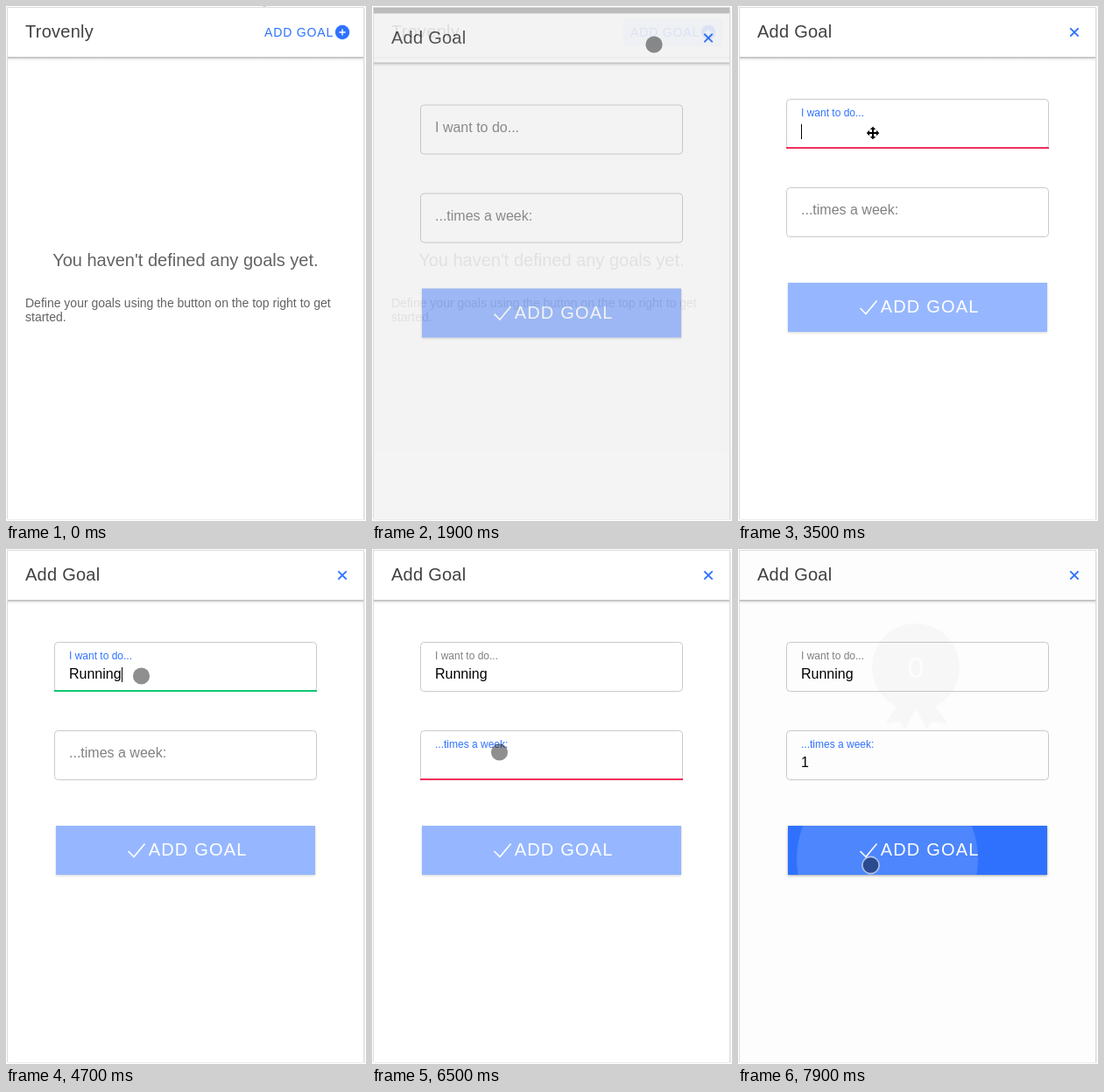
These frames come from a looping animation (411x588 px, 8 s). An HTML page:

```html
<!DOCTYPE html>
<html lang="en">
<head>
<meta charset="utf-8">
<title>Goal tracker</title>
<style>
  html, body { margin: 0; width: 100%; height: 100%; overflow: hidden; background: #fff; }
  svg { display: block; width: 100vw; height: 100vh; }
  text { font-family: "Liberation Sans", Arial, sans-serif; white-space: pre; }
  .title { font-size: 20px; letter-spacing: .25px; fill: #424242; }
  .soft { fill: #636363; }
  .p { font-size: 14px; }
  #submit { filter: drop-shadow(0 1.5px 1.5px rgba(0, 0, 0, .35)); }
</style>
</head>
<body>
<svg id="stage" viewBox="0 0 411 588"></svg>
<script>
const LOOP = 8000, STEP = 100;
const BLUE = '#2f72ff', GREY = '#808080', RED = [240, 47, 91], GREEN = [16, 200, 112];
const $ = id => document.getElementById(id);
const set = (id, attrs) => { for (const k in attrs) $(id).setAttribute(k, attrs[k]); };
const clamp = x => Math.min(1, Math.max(0, x));
const span = (t, from, len) => clamp((t - from) / len);
const easeOut = x => 1 - (1 - x) ** 4;
const mix = (a, b, p) => a + (b - a) * p;
const mixRgb = (a, b, p) => `rgb(${a.map((v, i) => Math.round(mix(v, b[i], p)))})`;

const page = title => `
  <rect x="2" y="2" width="406" height="584" fill="#fff"/>
  <rect x="2" y="58" width="406" height="5" fill="url(#headShade)"/>
  <text class="title" x="22" y="36">${title}</text>`;

const field = (id, y, label) => `
  <rect x="55.5" y="${y + .5}" width="299" height="56" rx="4" fill="#fff" stroke="#cacaca"/>
  <rect id="${id}Line" y="${y + 55}" height="2"/>
  <text id="${id}Label" x="72">${label}</text>
  <text id="${id}Value" x="72" y="${y + 42}" font-size="16"></text>
  <rect id="${id}Caret" y="${y + 29}" width="1" height="17"/>`;

const arrow = [0, 90, 180, 270].map(a =>
  `<path transform="rotate(${a})" d="M-1 0V-4H-3.2L0 -7.2L3.2 -4H1V0Z"/>`).join('');

$('stage').innerHTML = `
  <defs>
    <linearGradient id="headShade" x2="0" y2="1">
      <stop offset="0" stop-color="#bdbdbd"/><stop offset=".3" stop-color="#cfcfcf"/>
      <stop offset=".45" stop-color="#ececec"/><stop offset="1" stop-color="#fff"/>
    </linearGradient>
    <clipPath id="screen"><rect x="2" y="2" width="406" height="584"/></clipPath>
    <clipPath id="addClip"><rect x="287" y="14" width="114" height="32" rx="1"/></clipPath>
    <clipPath id="submitClip"><rect x="57" y="316" width="296" height="56"/></clipPath>
  </defs>
  <rect width="411" height="588" fill="#fff"/>
  <path d="M409.5 3V587M3 586.5H410" stroke="#ededed" fill="none"/>
  <rect x="1.5" y="1.5" width="407" height="584" fill="none" stroke="#dcdcdc"/>
  <g clip-path="url(#screen)">
    <g id="home">
      ${page('Trovenly')}
      <circle id="addRipple" cx="335" cy="30" fill="${BLUE}" clip-path="url(#addClip)"/>
      <text x="295" y="35" font-size="14" letter-spacing=".84" fill="${BLUE}">ADD GOAL</text>
      <circle cx="384" cy="30" r="8.2" fill="${BLUE}"/>
      <path d="M380.5 30H387.5M384 26.5V33.5" stroke="#fff" stroke-width="1.4"/>
      <text class="soft" x="53.2" y="297" font-size="20">You haven't defined any goals yet.</text>
      <text class="soft p" x="22" y="344">Define your goals using the button on the top right to get</text>
      <text class="soft p" x="22" y="360">started.</text>
    </g>
    <rect id="shade" x="2" y="2" width="406" height="584"/>
    <g id="modal">
      ${page('Add Goal')}
      <path d="M379.3 25.3L388.7 34.7M388.7 25.3L379.3 34.7" stroke="${BLUE}" stroke-width="1.9"/>
      ${field('what', 106, 'I want to do...')}
      ${field('times', 207, '...times a week:')}
      <g id="submit">
        <rect x="57" y="316" width="296" height="56" fill="${BLUE}"/>
        <circle id="submitRipple" cx="170.5" cy="354" r="103.5" fill="#fff" opacity=".15" clip-path="url(#submitClip)"/>
        <path d="M139.5 345L146 351.5L158.5 336.5" fill="none" stroke="#fff" stroke-width="1.7"/>
        <text x="162.7" y="350" font-size="20" letter-spacing="1.2" fill="#fff">ADD GOAL</text>
      </g>
    </g>
    <rect id="shade2" x="2" y="2" width="406" height="584"/>
    <g id="badge" fill="#555">
      <path d="M182 178L168 200L184 197L191 206L203 182L215 206L222 197L240 200L224 178Z"/>
      <circle cx="203" cy="135" r="50"/>
      <text x="203" y="147" font-size="34" text-anchor="middle" fill="#fff">0</text>
    </g>
  </g>
  <circle id="dot" r="9.6" fill="#000" fill-opacity=".44" stroke="#fff" stroke-width="1.6"/>
  <g id="mover" transform="translate(154 145)" stroke="#fff" stroke-width="1.2">
    ${arrow}<g stroke="none">${arrow}</g>
  </g>`;

// pointer stops: time, x, y
const path = [
  [0, 295, -9.2], [500, 295, -9.2], [600, 295, -12], [900, 295, -12], [1000, 300, 0],
  [1300, 323, 42], [1900, 322, 44], [2000, 296, 80], [2100, 247, 132], [2200, 198, 144],
  [2400, 158, 146], [2500, 158, 146], [2600, 154.5, 145], [5200, 154.5, 145],
  [5300, 154, 151], [5600, 147, 225], [5800, 145.5, 232], [6800, 145.5, 232],
  [6900, 146, 244], [7100, 152, 348], [7200, 152.5, 362.5], [7300, 152.5, 362.5],
  [7400, 151.5, 361], [LOOP, 151.5, 361]
];

function pointer(t) {
  const i = path.findIndex(p => p[0] > t);
  const [a, b] = [path[i - 1], path[i]];
  const p = span(t, a[0], b[0] - a[0]);
  return [mix(a[1], b[1], p), mix(a[2], b[2], p)];
}

const fields = [
  { id: 'what', y: 106, focus: 3150, blur: 5950, keys: [[3700, 'R'], [4000, 'u'], [4200, 'n'], [4300, 'n'], [4500, 'i'], [4700, 'ng']] },
  { id: 'times', y: 207, focus: 5950, blur: 7850, keys: [[6600, '1']] }
];

function drawField(f, t) {
  const typed = f.keys.filter(k => k[0] <= t);
  const focused = t >= f.focus && t < f.blur;
  const float = easeOut(span(t, f.focus, 150));
  const grow = span(t, f.focus, 200) * (1 - span(t, f.blur, 50));
  const valid = span(t, f.keys[0][0] - 50, 100);
  const value = $(f.id + 'Value');
  value.textContent = typed.map(k => k[1]).join('');

  set(f.id + 'Label', {
    y: f.y + mix(31, 20, float),
    'font-size': mix(16, 12, float),
    fill: focused || (f.id === 'times' && t >= f.blur) ? BLUE : GREY
  });
  set(f.id + 'Line', {
    x: 205 - 150 * grow, width: 300 * grow,
    fill: mixRgb(RED, GREEN, valid)
  });
  // the blink restarts with each key
  const since = t - (typed.length ? typed[typed.length - 1][0] - 50 : f.focus - 50);
  set(f.id + 'Caret', {
    x: Math.round(72 + (typed.length ? value.getComputedTextLength() : 0)),
    opacity: focused && Math.floor(since / 530) % 2 === 0 ? 1 : 0
  });
}

function draw(t) {
  const open = easeOut(span(t, 1798, 280));
  const next = easeOut(span(t, 7898, 280));
  set('shade', { opacity: .32 * open });
  set('modal', { opacity: open, transform: `translate(0 ${40 * (1 - open)})` });
  set('shade2', { opacity: .32 * next });
  set('badge', { opacity: next });
  set('addRipple', { r: t < 1800 ? 0 : 66 + (t - 1800) / 8, opacity: .18 });
  set('submit', { opacity: t < 6600 ? .5 : 1 });
  set('submitRipple', { visibility: t < 7900 ? 'hidden' : 'visible' });
  fields.forEach(f => drawField(f, t));

  const [x, y] = pointer(t);
  const moving = t >= 3400 && t < 3700;
  set('dot', { cx: x, cy: y, opacity: moving ? 0 : 1, 'stroke-opacity': y > 306 ? .6 : 0 });
  set('mover', { opacity: moving ? 1 : 0 });
}

const start = performance.now();
function tick() {
  const t = (performance.now() - start) % LOOP;
  draw(Math.floor(t / STEP) * STEP);
  requestAnimationFrame(tick);
}
tick();
</script>
</body>
</html>
```
